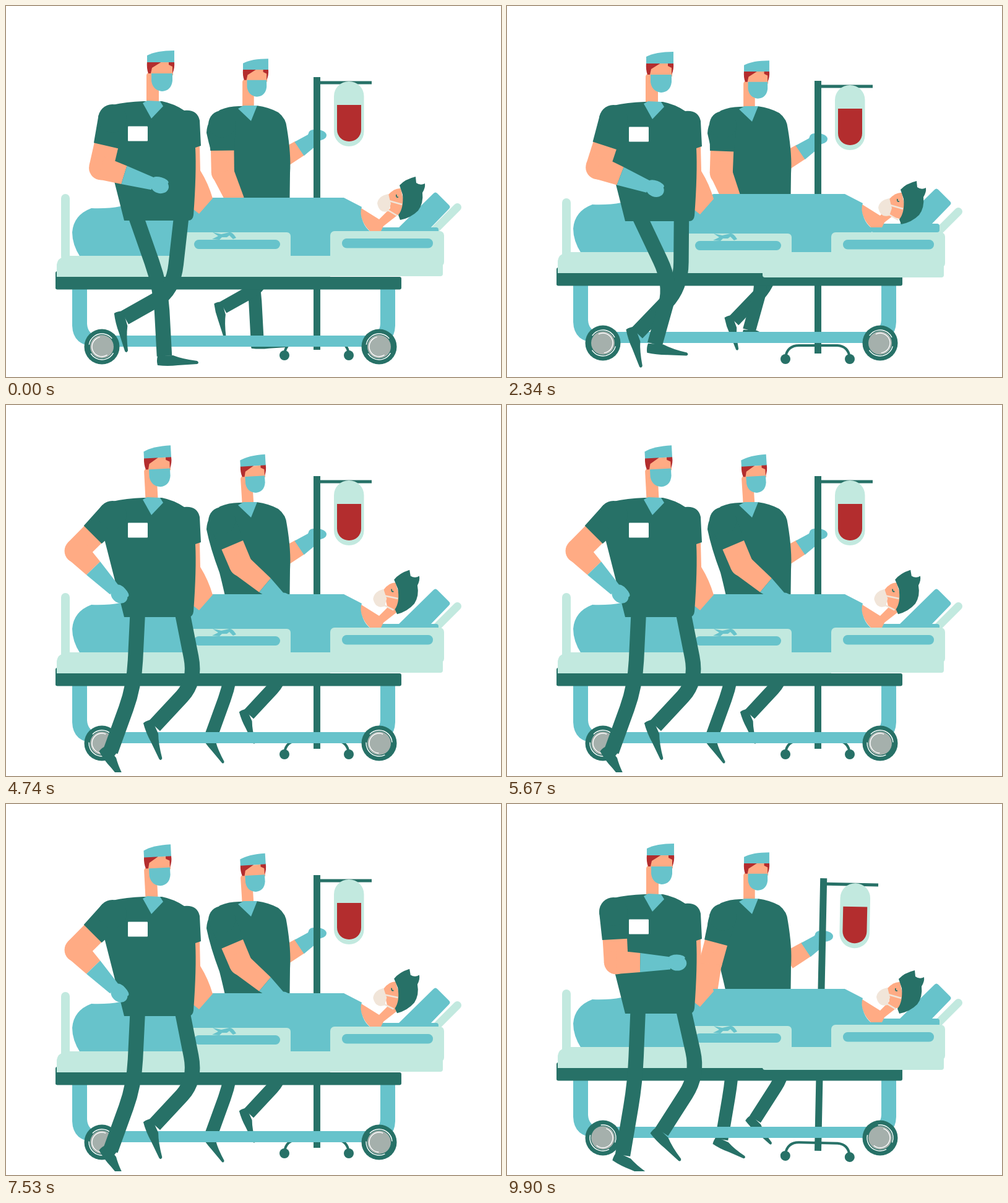
Recreate the animation shown at these times as an HTML page with a canvas. Size 800 px wide and 600 px high, loop 9930 ms.

```html
<!DOCTYPE html>
<html lang="en">
<head>
<meta charset="utf-8">
<title>Hospital transport</title>
<style>
  html, body { margin: 0; width: 100%; height: 100%; overflow: hidden; background: #fff; }
  canvas { display: block; width: 800px; height: 600px; }
</style>
</head>
<body>
<canvas id="stage" width="800" height="600"></canvas>
<script>
const ctx = document.getElementById('stage').getContext('2d');
const DARK = '#277167', TEAL = '#67c3cb', PALE = '#c2e9df', SKIN = '#ffab84',
      RED = '#b32d2e', GREY = '#a5b0ac', CREAM = '#f1e5d9', WHITE = '#fff';
const LOOP = 9930, CYCLE = 930, STEP = 30;

// Smooth periodic interpolation without overshoot; times are fractions of a cycle.
function curve(times, values, phase) {
  const n = times.length;
  const time = i => times[(i + n) % n] + Math.floor(i / n);
  const value = i => values[(i + n) % n];
  const slope = i => (value(i + 1) - value(i)) / (time(i + 1) - time(i));
  const tangent = i => {
    const a = slope(i - 1), b = slope(i);
    return a * b <= 0 ? 0 : 2 * a * b / (a + b);
  };
  let i = n - 1;
  while (i > 0 && times[i] > phase) i--;
  const h = time(i + 1) - time(i), u = (phase - time(i)) / h, v = 1 - u;
  return v * v * (1 + 2 * u) * value(i) + u * v * v * h * tangent(i) +
         u * u * (3 - 2 * u) * value(i + 1) - u * u * v * h * tangent(i + 1);
}

const BEATS = [0, .097, .27, .516, .645, .8];
let phase = 0;
const sway = (...values) => curve(BEATS, values, phase);

// Each row: time, hip x, knee x, knee y, ankle x, ankle y, foot angle.
const STRIDE = [
  [0, 208, 250, 455, 256, 566, 0],
  [.016, 212, 266, 450, 239, 547, 6],
  [.097, 213, 207, 455, 169, 560, 54],
  [.145, 212, 207, 450, 187, 568, 27],
  [.3, 235, 238, 450, 165, 545, 55],
  [.5, 284, 270, 460, 192, 504, 76],
  [.516, 282, 281, 455, 210, 529, 72],
  [.597, 284, 307, 447, 240, 519, 68],
  [.645, 284, 309, 438, 250, 530, 46],
  [.8, 255, 290, 450, 320, 560, -8]
];
const STRIDE_TIMES = STRIDE.map(row => row[0]);

function fill(path, color) {
  ctx.fillStyle = color;
  ctx.fill(new Path2D(path));
}
function line(path, color, width, cap = 'butt') {
  ctx.strokeStyle = color;
  ctx.lineWidth = width;
  ctx.lineCap = cap;
  ctx.stroke(new Path2D(path));
}
function box(x, y, w, h, r, color) {
  ctx.fillStyle = color;
  ctx.beginPath();
  ctx.roundRect(x, y, w, h, r);
  ctx.fill();
}
function oval(x, y, rx, ry, color, angle = 0) {
  ctx.fillStyle = color;
  ctx.beginPath();
  ctx.ellipse(x, y, rx, ry, angle, 0, 7);
  ctx.fill();
}
function group(x, y, draw, angle = 0, px = 0, py = 0) {
  ctx.save();
  ctx.translate(x + px, y + py);
  ctx.rotate(angle * Math.PI / 180);
  ctx.translate(-px, -py);
  draw();
  ctx.restore();
}
function reach([x, y], degrees, length) {
  const a = degrees * Math.PI / 180;
  return [x + Math.cos(a) * length, y + Math.sin(a) * length];
}
function taper([ax, ay], [bx, by], wa, wb, color) {
  const d = Math.hypot(bx - ax, by - ay) || 1;
  const nx = (ay - by) / d / 2, ny = (bx - ax) / d / 2;
  ctx.fillStyle = color;
  ctx.beginPath();
  ctx.moveTo(ax + nx * wa, ay + ny * wa);
  ctx.lineTo(bx + nx * wb, by + ny * wb);
  ctx.lineTo(bx - nx * wb, by - ny * wb);
  ctx.lineTo(ax - nx * wa, ay - ny * wa);
  ctx.fill();
}

function leg(offset, lift) {
  const p = (phase + offset) % 1;
  const [hx, kx, ky, ax, ay, turn] =
    [1, 2, 3, 4, 5, 6].map(c => curve(STRIDE_TIMES, STRIDE.map(row => row[c]), p));
  const hy = 335 + lift;
  const bend = (from, knee) => from + (knee - from) * .66;
  ctx.strokeStyle = DARK;
  ctx.lineWidth = 24.5;
  ctx.lineCap = 'butt';
  ctx.beginPath();
  ctx.moveTo(hx, hy);
  ctx.lineTo(bend(hx, kx), bend(hy, ky));
  ctx.quadraticCurveTo(kx, ky, bend(ax, kx), bend(ay, ky));
  ctx.lineTo(ax, ay);
  ctx.stroke();
  group(ax, ay, () =>
    fill('M-11 0Q-13 8-11 15Q5 17 22 15L53 13Q57 11 53 8Q29 5 14-1Z', DARK), turn);
}
function legs(lift) {
  leg(0, lift);
  leg(.5, lift);
}

function arm(shoulder, upper, fore, size, cuffAt) {
  const down = 90 + upper;
  const elbow = reach(shoulder, down, 82 * size);
  const cuff = reach(elbow, fore, cuffAt);
  const wrist = reach(elbow, fore, 88 * size);
  const palm = reach(elbow, fore, 99 * size);
  taper(shoulder, elbow, 40 * size, 39 * size, SKIN);
  oval(...elbow, 19.5 * size, 19.5 * size, SKIN);
  taper(elbow, cuff, 38 * size, 31 * size, SKIN);
  taper(cuff, wrist, 31 * size, 20 * size, TEAL);
  oval(...palm, 15 * size, 12 * size, TEAL, fore * Math.PI / 180);
  oval(...reach(palm, fore - 95, 9 * size), 13 * size, 5 * size, TEAL, fore * Math.PI / 180);
  taper(shoulder, reach(shoulder, down, 45 * size), 46 * size, 41 * size, DARK);
  oval(...shoulder, 23 * size, 23 * size, DARK);
}

function head() {
  fill('M227 112Q228 106 236 108L247 130V157H227Z', SKIN);
  fill('M234 91H270V112H234Z', SKIN);
  fill('M228 90H252L236 100L234 109H230Q227 101 228 90Z', RED);
  fill('M263 90H272Q273 101 269 109V98L263 95Z', RED);
  fill('M228 80Q243 72 272 72V91H228Z', TEAL);
  fill('M235 109H269V121Q267 137 252 138Q237 136 235 121Z', TEAL);
}

function backNurse(lift) {
  ctx.save();
  ctx.translate(186, 54);
  ctx.scale(.86, .86);
  legs(lift);
  ctx.restore();

  const dx = sway(0, 0, 0, 0, 9, 5), dy = sway(0, 0, 3, 6, 5, 2);
  group(dx, dy, () => {
    taper([445, 248], [475, 230], 30, 27, SKIN);
    taper([474, 231], [499, 214], 27, 21, TEAL);
    oval(503, 209, 15, 9, TEAL);
    oval(497, 206, 8, 6, TEAL);
  });
  group(sway(0, -.5, 0, 0, 0, 0), sway(0, -4, -13, 3, -7, -15), () => {
    ctx.translate(171, 18.4);
    ctx.scale(.93, .93);
    head();
  }, sway(0, -3.5, -3, 0, 0, 1), 393, 163);
  group(0, lift, () => {
    fill('M324 205Q325 182 346 168Q360 162 376 162L405 161Q426 164 440 172Q453 182 454 198Q461 240 459 270L458 350H362Q352 302 345 275Q330 235 324 205Z', DARK);
    fill('M375 166L384 161L406 161L396 186Z', TEAL);
    arm([349, 191], sway(-1, -23, -31, 2, 15, 21), sway(66, 40, 36, 68, 95, 104), .95, 51);
  });
}

function drip() {
  group(0, sway(0, 0, 3, 6, 5, 2), () => {
    box(497, 115, 11, 441, 0, DARK);
    box(507, 121.5, 84, 5, 0, DARK);
    box(530, 122, 48.5, 105, 24, PALE);
    box(535, 160, 39, 59, [0, 0, 19, 19], RED);
    line('M450 562Q453 543 472 543H534Q551 544 554 562', DARK, 4);
    oval(450, 565, 8, 8, DARK);
    oval(554, 565, 8, 8, DARK);
  }, sway(0, 0, 0, 0, 1.2, .7), 503, 556);
}

function wheel(x) {
  group(x, 551, () => {
    oval(0, 0, 28.5, 28.5, DARK);
    oval(0, 0, 19, 19, GREY);
    const spin = phase * 2 * Math.PI;
    ctx.strokeStyle = WHITE;
    ctx.lineWidth = 1.4;
    for (const [r, from, to] of [[21, .5, 2.6], [21, 3.3, 5.6], [16, 1, 4.5]]) {
      ctx.beginPath();
      ctx.arc(0, 0, r, from + spin, to + spin);
      ctx.stroke();
    }
  });
}

function patientHead() {
  fill('M618 305Q628 294 638 295L644 322L638 338L622 334Z', SKIN);
  fill('M636 290Q645 280 662 276L663 286Q670 291 677 287Q678 294 673 302Q675 319 666 331Q654 343 637 346L634 338Q643 327 641 305Z', DARK);
  fill('M600 319Q602 307 618 304L622 320L618 332Q603 336 600 319Z', CREAM);
  line('M619 315L640 321M617 330L632 339', CREAM, 2.5);
  line('M631 305Q630 310 634 309', DARK, 1.8);
}

function bed() {
  const frame = sway(0, -4, -8, -6, -11, -8);
  const ends = sway(0, 0, 4, 7, -4, -8);
  const rail = sway(0, -4, -5, 2, -7, -6);

  group(0, ends, () => {
    line('M96 311V405', PALE, 14, 'round');
    line('M729.5 325.5L690 365', PALE, 13, 'round');
  });
  group(0, frame, () => {
    fill('M107 455H131V514Q132 530 146 533H590Q604 530 605 514V455H629V517Q628 549 592 551H144Q108 549 107 517Z', TEAL);
    box(80, 429, 8, 29, 3, DARK);
    box(80, 438, 559, 20.5, 3, DARK);
    fill('M635 358L691 303Q694 300 697 303L716 322Q719 325 716 328L685 360Z', TEAL);
    box(588, 358, 111, 14, 4, TEAL);
    fill('M571 325L603 345L629 319L642 331L610 356L606 364H588Q573 350 571 325Z', SKIN);
    fill('M107 366Q109 338 138 327Q165 328 185 324L300 322L334 310H546L575 325Q571 335 577 349Q581 359 589 365L590 406H120Q107 386 107 366Z', TEAL);
    wheel(155);
    wheel(603);
  });
  group(sway(0, -5, -3, 0, -3, 0), sway(0, -8, -6, 7, -7, -6), patientHead,
    sway(0, -4, -2, 0, 0, 0), 640, 345);

  group(0, frame, () => {
    fill('M82 438V418Q83 408 96 404H524V438Z', PALE);
  });
  group(0, rail, () => {
    box(286, 366, 174, 45, 6, PALE);
    box(524, 364, 184, 57, 7, PALE);
    box(413, 408, 293, 29, 4, PALE);
    box(304, 378, 139, 15, 7.5, TEAL);
    box(543, 376, 147, 15.5, 7.5, TEAL);
    fill('M334 366L348 369L361 366Q366 365 372 375L367 377L361 371L357 374H349L345 378L333 377L343 372Z', TEAL);
  });
}

function frontNurse(lift) {
  legs(lift);
  group(0, lift, () => {
    fill('M302 220L313 226L314 266Q327 287 334 311L312 336L298 325Z', SKIN);
  });
  group(sway(0, -1.5, -2, -3, -2, 0), sway(0, -5, -13, 2, -8, -17), head,
    sway(0, -3, -3, 0, 0, 1), 237, 157);
  group(0, lift, () => {
    fill('M152 190Q151 167 172 160Q194 155 222 154H252Q272 158 288 169Q309 167 313 185L315 226L306 229Q308 270 303 338Q302 347 294 347H191Q178 295 158 217Z', DARK);
    fill('M221 157L228 153L249 154L254 162L235 182Z', TEAL);
    box(197, 194.5, 32, 24, 1, WHITE);
    arm([172, 182], sway(13, 45, 51, 18, -3, -12), sway(17, 46, 54, 21, 1, -7), 1, 39);
  });
}

function render(now) {
  const time = Math.floor(now % LOOP / STEP) * STEP;
  phase = time % CYCLE / CYCLE;
  const lift = sway(0, -4, -13, 1, -8, -13);
  ctx.fillStyle = WHITE;
  ctx.fillRect(0, 0, 800, 600);
  ctx.save();
  ctx.beginPath();
  ctx.rect(0, 0, 800, 594);
  ctx.clip();
  backNurse(lift);
  drip();
  bed();
  frontNurse(lift);
  ctx.restore();
}

let start;
function tick(now) {
  start ??= now;
  render(now - start);
  requestAnimationFrame(tick);
}
render(0);
requestAnimationFrame(tick);
</script>
</body>
</html>
```
